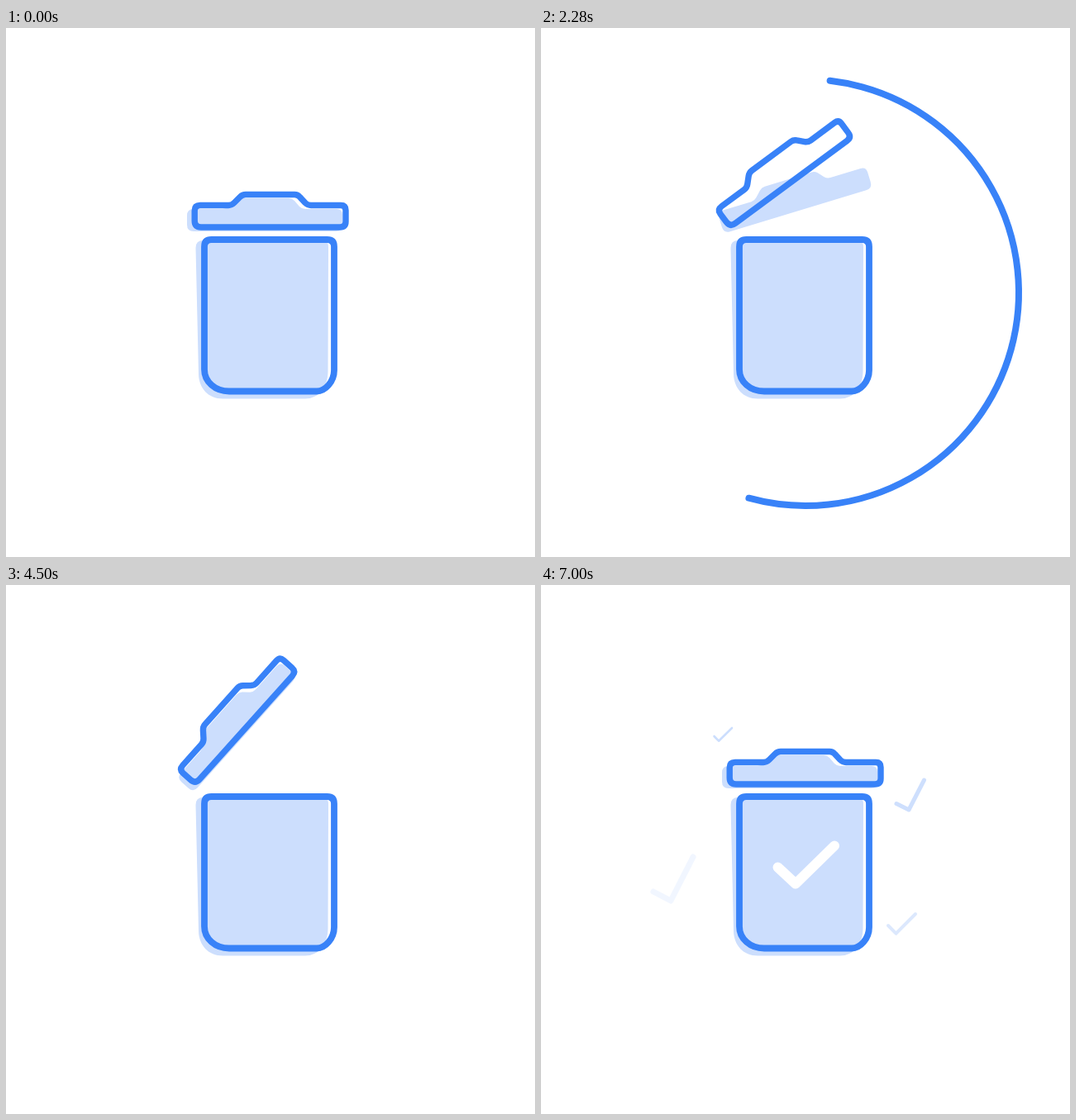
These frames come from a looping animation (640x640 px, 8 s). An HTML page with a canvas:

```html
<!DOCTYPE html>
<html lang="en">
<head>
<meta charset="utf-8">
<title>Empty the bin</title>
<style>
  html, body { margin: 0; height: 100%; overflow: hidden; background: #fff; }
  canvas { display: block; }
</style>
</head>
<body>
<canvas id="stage" width="640" height="640"></canvas>
<script>
const ctx = document.getElementById('stage').getContext('2d');
const BLUE = '#3882f8', PALE = '#ccdefd';
const LOOP = 8000, FPS = 14;
const RING = 258, OPEN = 78.2 * Math.PI / 180, PIVOT = [228.5, 240];

const lidLine = new Path2D(`M228.2 221 Q228.2 214.5 235 214.5 H269 Q273 214.5 276 211.5
  L283 204.5 Q286 201.5 290 201.5 H349 Q353 201.5 355.5 204.5 L362 211.5 Q365 214.5 369 214.5
  H405 Q411 214.5 411 220.5 V234 Q411 241 404 241 H236 Q228.2 241 228.2 233 Z`);
const lidFill = new Path2D(`M219 227 Q219 219 227 219 H262 Q266 219 269 216 L276 209
  Q279 206 283 206 H342 Q346 206 349 209 L355 216 Q358 219 362 219 H400 Q407 219 407 226
  V238 Q407 246 399 246 H227 Q219 246 219 238 Z`);
const binLine = new Path2D(`M240 264.5 Q240 256 248.5 256 H388.5 Q397 256 397 264.5 V414
  C397 428 386 439.5 376 439.5 H270 C253 439.5 240 428 240 413 Z`);
const binFill = new Path2D(`M229.5 266 Q229.5 257 238.5 257 H382 Q390 257 390 265 L389.5 415
  C389.5 435 378 448.5 362 448.5 H262 C245 448.5 233.5 436 233 419 Z`);
const tick = new Path2D('M286.5 341.5 L308 361.5 L355 315.5');
const TICK_LENGTH = 95.3;

// Small ticks: path, line width, first step of the fade
const sparks = [
  ['M209.5 183 L215 188.7 L231 173', 2.6, 88],
  ['M430 264.5 L445 272 L463.5 236', 5, 89.3],
  ['M420 412 L429.5 421.7 L453 398', 4, 91.8],
  ['M136 371 L157 382 L184 329', 7, 94.6]
].map(([d, width, start]) => [new Path2D(d), width, start]);

// Smooth 0 to 1 ramp
function ramp(k, start, length) {
  const u = Math.min(1, Math.max(0, (k - start) / length));
  return u * u * (3 - 2 * u);
}

function line(path, color, width) {
  ctx.strokeStyle = color;
  ctx.lineWidth = width;
  ctx.stroke(path);
}

function fill(path, color) {
  ctx.fillStyle = color;
  ctx.fill(path);
}

function rotated(angle, paint) {
  ctx.save();
  ctx.translate(...PIVOT);
  ctx.rotate(-angle);
  ctx.translate(-PIVOT[0], -PIVOT[1]);
  paint();
  ctx.restore();
}

function drawRing(k) {
  const head = ramp(k, 6.8, 27.4), tail = ramp(k, 25.4, 14);
  if (head === 0 || tail >= head) return;
  const at = p => -Math.PI / 2 - p * 2 * Math.PI;
  const arc = new Path2D();
  arc.arc(320, 320, RING, at(tail), at(head), true);
  line(arc, BLUE, 8);
}

function drawBall(k) {
  const radius = 7.6 * ramp(k, 36, 8);
  if (radius === 0 || k >= 58) return;
  const ball = new Path2D();
  ball.arc(323.5, 62.5 + 285 * ramp(k, 45, 20), radius, 0, 7);
  fill(ball, BLUE);
}

function drawLid(k) {
  const shut = k < 63 ? 1 : k < 73 ? 2 ** (62.3 - k) : 0;
  rotated(OPEN * shut * ramp(k, 29.3, 9), () => fill(lidFill, PALE));
  rotated(OPEN * shut * ramp(k, 27.7, 9), () => line(lidLine, BLUE, 7.4));
}

function drawTicks(k) {
  const drawn = ramp(k, 72, 8);
  if (drawn > 0) {
    ctx.setLineDash(drawn < 1 ? [drawn * TICK_LENGTH, 200] : []);
    line(tick, '#fff', 12);
    ctx.setLineDash([]);
  }
  for (const [path, width, start] of sparks) {
    ctx.globalAlpha = ramp(k, start, 10);
    line(path, PALE, width);
  }
  ctx.globalAlpha = 1;
}

function draw(now) {
  // Motion runs in steps of 1/14 s on a 10 ms clock and rests after step 98
  const clock = Math.floor(now % LOOP / 10) * 10 + 9.99;
  const k = Math.min(98, Math.floor(clock * FPS / 1000));
  ctx.clearRect(0, 0, 640, 640);
  ctx.lineCap = ctx.lineJoin = 'round';
  drawRing(k);
  drawBall(k);
  fill(binFill, PALE);
  line(binLine, BLUE, 7.8);
  drawLid(k);
  drawTicks(k);
}

const begin = performance.now();
function loop() {
  draw(performance.now() - begin);
  requestAnimationFrame(loop);
}
loop();
</script>
</body>
</html>
```
